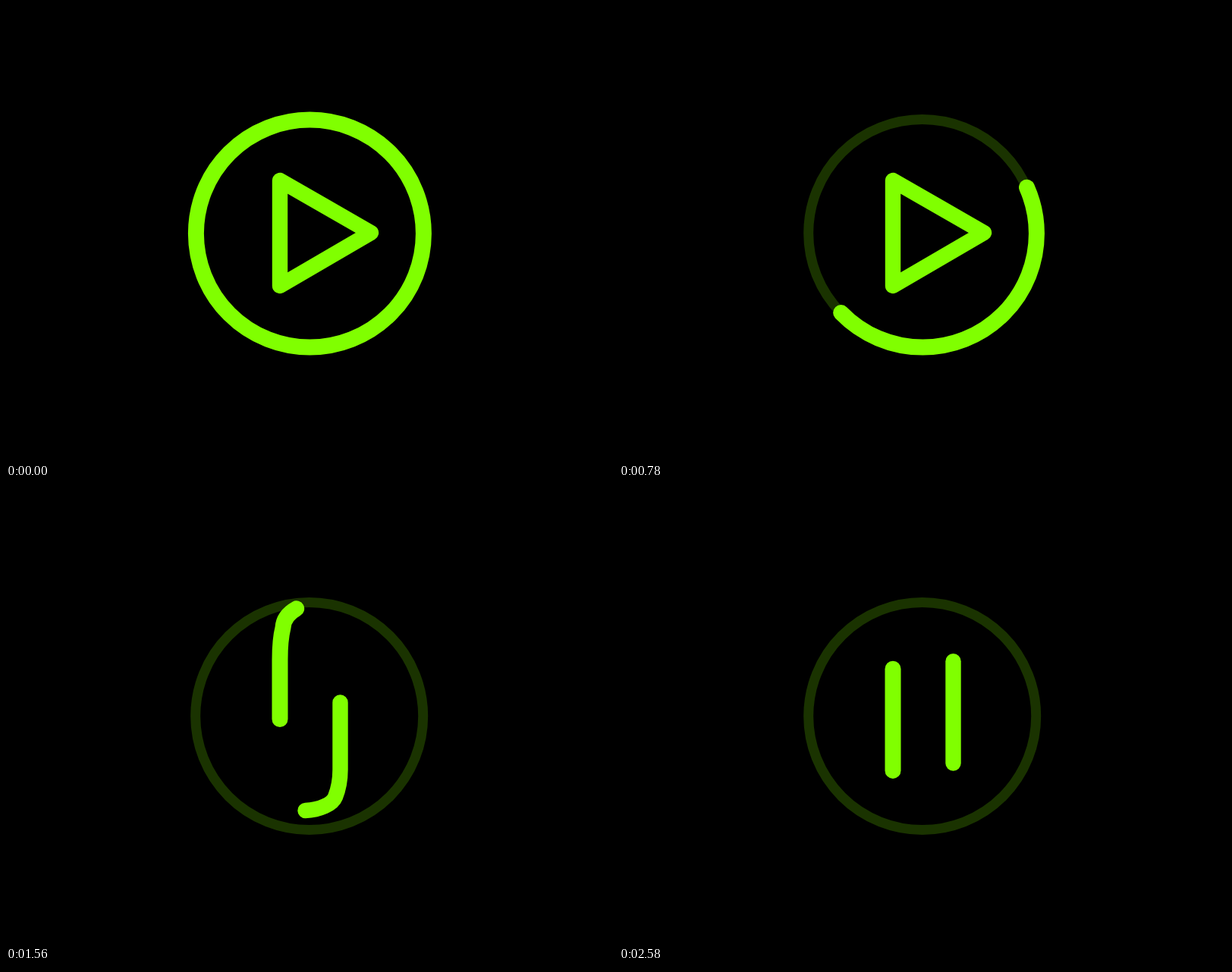
Write an HTML page that moves like this. It is 800 px wide and 600 px high and loops after 2640 ms.

```html
<!DOCTYPE html>
<html lang="en">
<head>
<meta charset="utf-8">
<title>Play to pause</title>
<style>
  html, body { margin: 0; width: 100%; height: 100%; overflow: hidden; background: #000; }
  svg { display: block; width: 100%; height: 100%; }
  path, circle { fill: none; stroke: #80ff00; stroke-linecap: round; stroke-linejoin: round; }
</style>
</head>
<body>
<svg viewBox="0 0 800 600">
  <circle cx="399.7" cy="299.5" r="150" stroke-width="13" style="stroke:#1a3300"/>
  <path id="ring" stroke-width="21" d="M550.4 300.1 A150 150 0 0 0 250.4 300.1 A150 150 0 0 0 550.4 300.1
    A150 150 0 0 0 471.9 168.2 C440 150 415 147 395 153 C380 157 366 167 365 183 C362 195 361 210 361 225 V420"/>
  <path id="triangle" stroke-width="20.4" d="M361 369 L481 299 L361 230 V375
    C361 410 368 425 392 424 C412 424 430 416 434 406 C438 396 440.5 384 440.5 370 V200"/>
</svg>
<script>
const LOOP = 2640, STEP = 60;

const cubic = (a, b, s) => 3 * a * s * (1 - s) ** 2 + 3 * b * s * s * (1 - s) + s ** 3;

// Cubic Bezier easing, solved by bisection; the wind-up below zero is held at rest.
function bezier(x1, y1, x2, y2) {
  return x => {
    let low = 0, high = 1;
    for (let i = 0; i < 30; i++) {
      const mid = (low + high) / 2;
      if (cubic(x1, x2, mid) < x) low = mid; else high = mid;
    }
    return Math.max(0, cubic(y1, y2, low));
  };
}

// One end of a stroke, sliding along its path from one distance to another.
const slide = (from, to, ease) => x => from + (to - from) * ease(x);

const strokes = [
  {
    path: document.getElementById('ring'),
    tail: slide(0, 1279.3, bezier(0.38, -0.35, 0.05, 1.15)),
    head: slide(942.5, 1414.8, bezier(0.6, -0.07, 0.3, 1.2))
  },
  {
    path: document.getElementById('triangle'),
    tail: slide(0, 578.5, bezier(0.5, -1.6, 0.1, 1.31)),
    head: slide(416.3, 714, bezier(0.6, -1.2, 0.2, 1.36))
  }
];

function draw(now) {
  const x = Math.floor(now % LOOP / STEP) * STEP / LOOP;
  for (const { path, tail, head } of strokes) {
    const start = tail(x);
    path.style.strokeDasharray = `${head(x) - start} 9999`;
    path.style.strokeDashoffset = -start;
  }
}

const began = performance.now();
function tick() {
  draw(performance.now() - began);
  requestAnimationFrame(tick);
}
tick();
</script>
</body>
</html>
```
